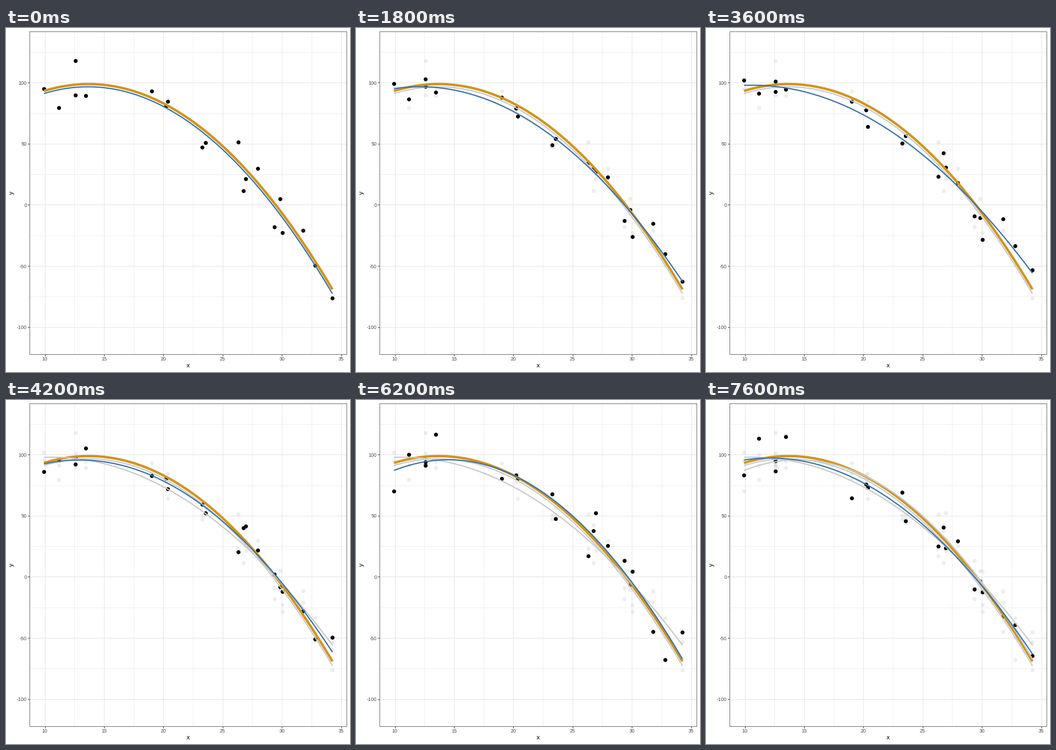
A matplotlib script that plays this animation: 600 by 600 pixels, repeating every 8 s.

```python
import numpy as np
import matplotlib.pyplot as plt
from matplotlib.animation import FuncAnimation
from matplotlib.ticker import MultipleLocator

plt.rcParams.update({
    "font.family": "Liberation Sans",
    "axes.unicode_minus": False,
    "lines.solid_capstyle": "butt",
})

SIZE, DPI = 600, 72          # one point is one pixel
FRAMES, INTERVAL = 80, 100
HOLD_FIRST, MOVE, PERIOD = 12, 10, 25

GOLD, BLUE, GREY = "#CF951E", "#3B70A6", "#C9C9C9"

X = np.array([9.94, 11.18, 12.61, 12.61, 13.46, 19.02, 20.25, 20.37, 23.25, 23.54,
              26.34, 26.76, 26.97, 27.94, 29.37, 29.87, 30.02, 31.78, 32.78, 34.27])

# One row of observations per sample
Y = np.array([
    [95.0, 79.5, 117.9, 90.0, 89.1, 93.1, 81.1, 84.6, 47.1, 50.9,
     51.3, 11.4, 21.1, 29.7, -18.1, 5.1, -22.6, -20.7, -49.5, -76.3],
    [102.0, 91.4, 92.8, 101.0, 94.5, 84.6, 77.4, 64.0, 50.6, 56.5,
     23.4, 42.2, 30.9, 17.8, -9.2, -10.4, -28.2, -11.5, -33.8, -53.5],
    [70.1, 99.9, 91.4, 93.9, 116.3, 80.6, 83.2, 80.2, 67.7, 47.6,
     17.1, 37.7, 52.3, 25.5, 13.3, -6.4, 4.2, -44.6, -67.8, -45.3],
    [83.2, 113.2, 95.0, 86.7, 114.7, 64.5, 75.5, 72.9, 69.2, 45.7,
     25.0, 40.5, 23.6, 29.5, -10.1, -3.6, -12.7, -32.0, -39.0, -64.5],
])

GRID_X = np.linspace(X[0], X[-1], 120)


def fit(y):
    """Least-squares parabola through the sample, along GRID_X."""
    return np.polyval(np.polyfit(X, y, 2), GRID_X)


def truth(x):
    return 98.8 - 0.397 * (x - 13.7) ** 2


fig = plt.figure(figsize=(SIZE / DPI, SIZE / DPI), dpi=DPI, facecolor="white")
left, right, top, bottom = 41.2, 594.5, 5.5, 568.5
ax = fig.add_axes([left / SIZE, 1 - bottom / SIZE,
                   (right - left) / SIZE, (bottom - top) / SIZE])
ax.set_xlim(8.728, 35.483)
ax.set_ylim(-122.0, 142.1)

ax.xaxis.set_major_locator(MultipleLocator(5))
ax.xaxis.set_minor_locator(MultipleLocator(2.5))
ax.yaxis.set_major_locator(MultipleLocator(50))
ax.yaxis.set_minor_locator(MultipleLocator(25))
ax.set_axisbelow(True)
ax.grid(which="major", color="#E6E6E6", lw=1.07)
ax.grid(which="minor", color="#EBEBEB", lw=0.7)
ax.tick_params(which="major", length=2.75, width=1.0, color="#333333", pad=2.2,
               labelsize=8.8, labelcolor="#4D4D4D")
ax.tick_params(which="minor", length=0)
for spine in ax.spines.values():
    spine.set(color="#737373", linewidth=1.0)

fig.text(317.8 / SIZE, 1 - 592.5 / SIZE, "x", size=11, ha="center", va="baseline")
fig.text(13.4 / SIZE, 1 - 287 / SIZE, "y", size=11, ha="center", va="baseline",
         rotation=90, rotation_mode="anchor")


def dots(y, **style):
    return ax.plot(X, y, "o", ms=6.9, mew=0, **style)[0]


def curve(y, color, width, z):
    return ax.plot(GRID_X, y, color=color, lw=width, zorder=z)[0]


shadows = [(dots(y, color="#CCCCCC", alpha=0.35, zorder=2.5),
            curve(fit(y), GREY, 2.13, 4)) for y in Y[:-1]]
points = dots(Y[0], color="black", zorder=2.6)
curve(truth(GRID_X), GOLD, 4.27, 3)
line = curve(fit(Y[0]), BLUE, 2.13, 5)


def update(frame):
    # Linear move between samples, then a hold
    steps = np.clip((frame - HOLD_FIRST - PERIOD * np.arange(len(Y) - 1)) / MOVE, 0, 1)
    y = Y[0] + steps @ np.diff(Y, axis=0)
    points.set_ydata(y)
    line.set_ydata(fit(y))
    for pair, step in zip(shadows, steps):
        for artist in pair:
            artist.set_visible(bool(step > 0))
    return []


anim = FuncAnimation(fig, update, frames=FRAMES, interval=INTERVAL,
                     repeat=True, repeat_delay=0, blit=False)
plt.show()
```
